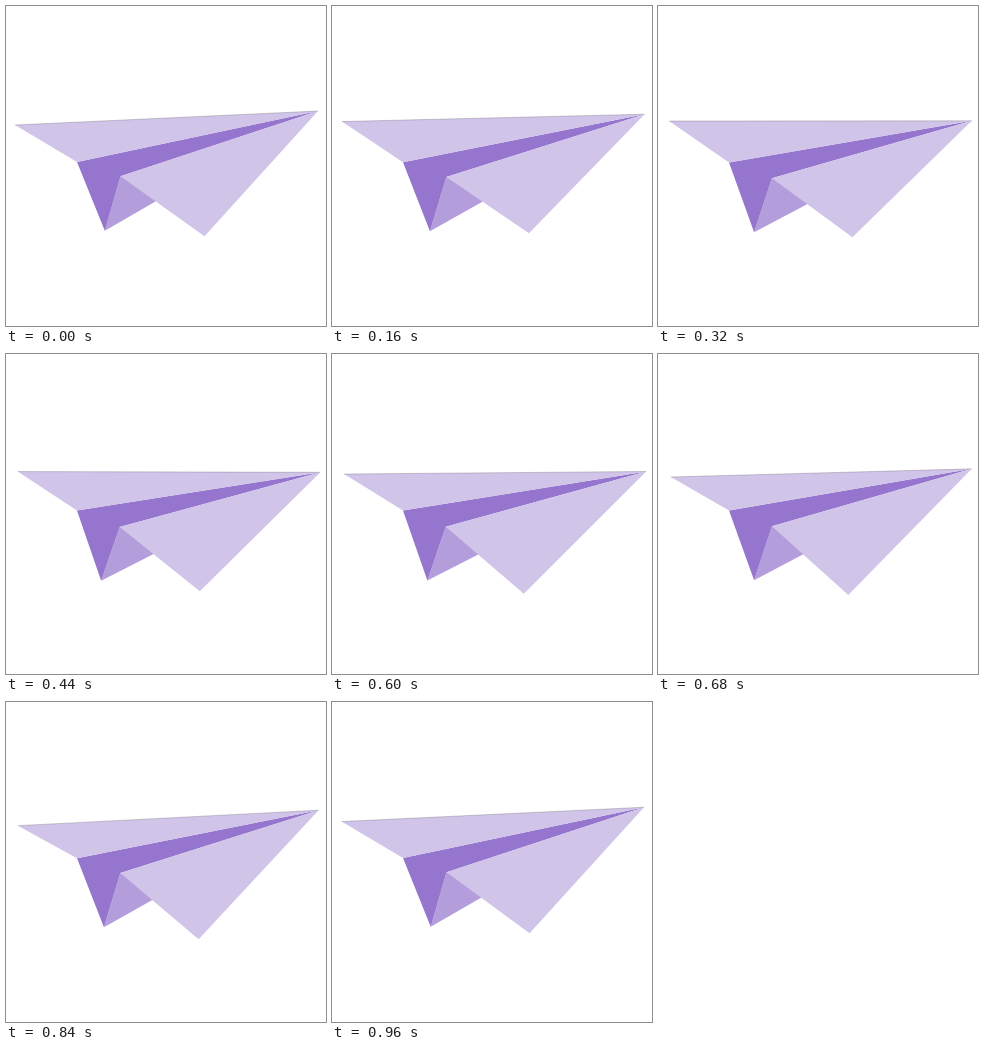
These frames come from a looping animation (320x320 px, 1000 ms). An HTML page:

```html
<!DOCTYPE html>
<html lang="en">
<head>
<meta charset="utf-8">
<title>Paper plane</title>
<style>
  html, body { margin: 0; width: 100%; height: 100%; overflow: hidden; background: #fff; }
  svg { display: block; width: 100%; height: 100%; }
</style>
</head>
<body>
<svg viewBox="0 0 320 320">
  <polygon id="keel" fill="#b39ddb"/>
  <polygon id="body" fill="#9575cd"/>
  <polygon id="leftWing" fill="#d1c4e9"/>
  <polygon id="rightWing" fill="#d1c4e9"/>
  <polyline id="rim" fill="none" stroke="#44404c" stroke-opacity=".5" stroke-width=".5"/>
</svg>
<script>
const LOOP = 1000, STEP = 40, TILT = 0.0545;
const pivot = [60, 156];
const rest = {
  left: [9, 119], nose: [312, 105], fold: [71, 156], tail: [98.8, 224.7],
  crease: [114.5, 170.2], right: [198.5, 230.2], hidden: [165, 186.5]
};

// time, left tip offset x y, right tip offset x y
const flap = [
  [0, 0, 0, 0, 0],
  [160, 0.5, -2.8, -0.6, -4.7],
  [320, 0.6, -2, -1.1, -4.3],
  [440, 0.6, 1.2, -0.6, -0.2],
  [600, 1.2, 3.5, -2.9, 2.7],
  [760, 3.1, 7.3, -6.6, 7],
  [960, 0.5, 0.6, -0.9, 0.9]
];

// Key at any index, wrapped around the loop
function key(i) {
  const n = flap.length, turn = Math.floor(i / n);
  const [t, ...v] = flap[i - turn * n];
  return { t: t + turn * LOOP, v };
}

// Smooth periodic interpolation through the flap keys
function flapAt(t) {
  let i = flap.length - 1;
  while (flap[i][0] > t) i--;
  const [a, b, c, d] = [i - 1, i, i + 1, i + 2].map(key);
  const span = c.t - b.t, u = (t - b.t) / span, w = 1 - u;
  return b.v.map((p, j) => {
    const q = c.v[j];
    const m = (q - a.v[j]) / (c.t - a.t) * span;
    const n = (d.v[j] - p) / (d.t - b.t) * span;
    return p * (1 + 2 * u) * w * w + m * u * w * w + q * u * u * (3 - 2 * u) - n * u * u * w;
  });
}

function rotate([x, y], angle) {
  const dx = x - pivot[0], dy = y - pivot[1];
  const c = Math.cos(angle), s = Math.sin(angle);
  return [pivot[0] + dx * c - dy * s, pivot[1] + dx * s + dy * c];
}

function shape(id, ...points) {
  document.getElementById(id).setAttribute('points',
    points.map(p => p.map(n => n.toFixed(2)).join()).join(' '));
}

function draw(t) {
  const angle = TILT * (1 - Math.cos(2 * Math.PI * t / LOOP)) / 2;
  const p = {};
  for (const name in rest) p[name] = rotate(rest[name], angle);
  const [lx, ly, rx, ry] = flapAt(t);
  p.left = [p.left[0] + lx, p.left[1] + ly];
  p.right = [p.right[0] + rx, p.right[1] + ry];

  shape('keel', p.tail, p.crease, p.hidden);
  shape('body', p.fold, p.nose, p.crease, p.tail);
  shape('leftWing', p.left, p.nose, p.fold);
  shape('rightWing', p.crease, p.nose, p.right);
  shape('rim', p.left, p.nose);
}

const start = performance.now();
function tick() {
  const t = (performance.now() - start) % LOOP;
  draw(Math.floor(t / STEP) * STEP);
  requestAnimationFrame(tick);
}
tick();
</script>
</body>
</html>
```
